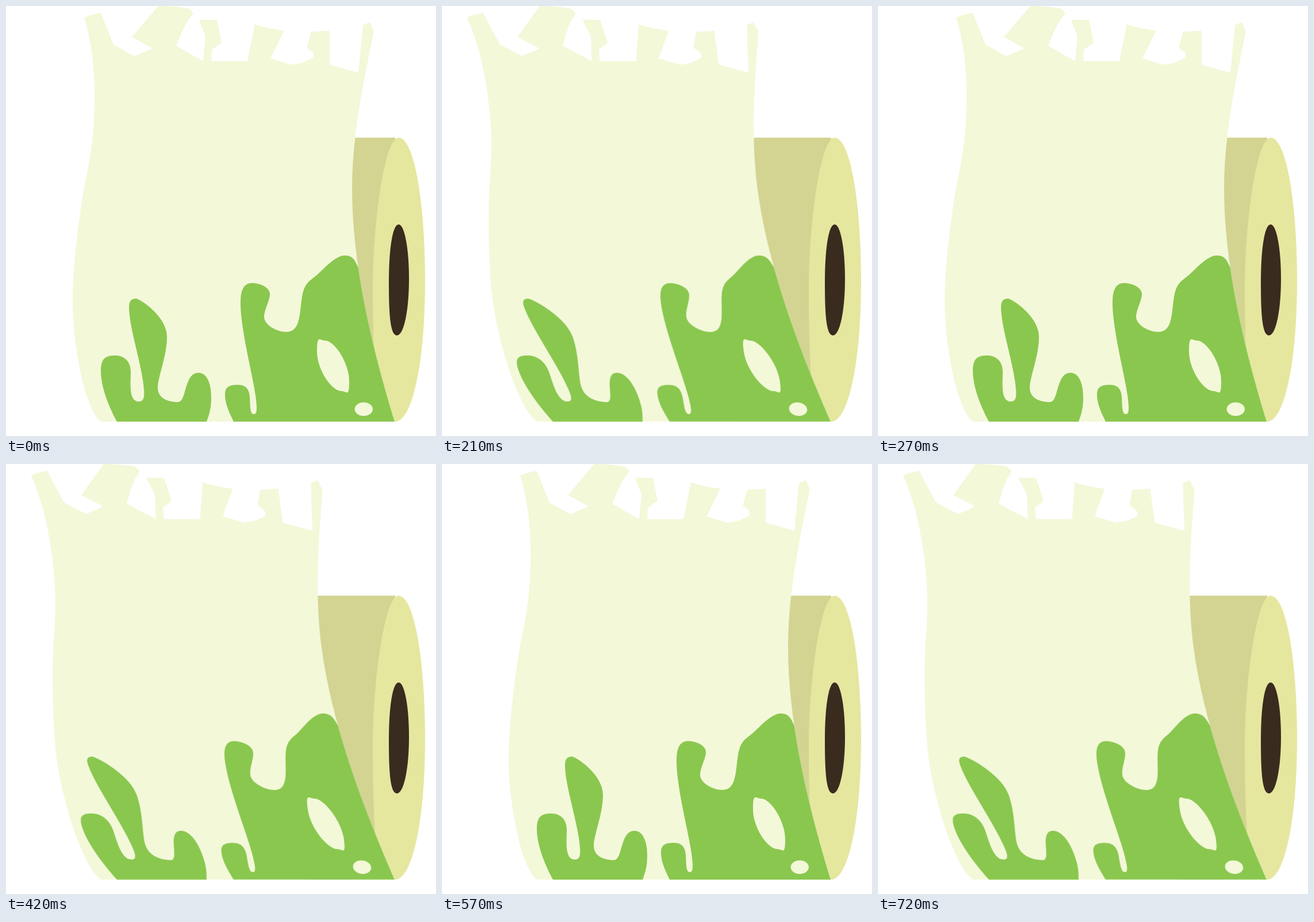
Write an HTML page that moves like this. It is 748 px wide and 748 px high and loops after 0.87 s.

```html
<!DOCTYPE html>
<html lang="en">
<head>
<meta charset="utf-8">
<title>Fluttering paper roll</title>
<style>
  html, body { margin: 0; width: 100%; height: 100%; overflow: hidden; background: #fff; }
  svg { display: block; width: 100%; height: 100%; }
  .paper { fill: #f3f8d9; }
  .slime { fill: #8ac74f; }
  .sheet { --lean: 7.49deg; }
  .drip { --lean: 19.65deg; }
  .sheet, .drip { transform-origin: 0 723px; animation: flutter 870ms step-end infinite; }
  @keyframes flutter {
    0%, 31.0345%, 65.5172% { transform: skewX(0deg); }
    13.7931%, 48.2759%, 82.7586%, 100% { transform: skewX(var(--lean)); }
  }
</style>
</head>
<body>
<svg viewBox="0 0 748 748">
  <defs>
    <path id="outline" d="M136 20C150 65 155 115 154 170S147 262 139 300 116 445 116 515 136 700 165 723H676
      C648 630 602 470 602 318C602 225 622 130 640 44L633 28 621 33 613 116 563 102V43L531 45 523 73
      C533 78 537 84 535 88S515 101 496 102L460 91 484 43Q458 40 433 32L420 96H357L358 76 375 64 367 24H336
      L347 53 343 96 296 69 306 45Q314 27 326 13L320 5Q296 0 265 0L219 54 255 74 223 87 187 67 165 12Q150 14 136 20Z"/>
    <clipPath id="inside"><use href="#outline"/></clipPath>
  </defs>

  <!-- roll -->
  <path fill="#d3d492" d="M520 229H677V723H520Z"/>
  <path fill="#e5e79f" d="M683 229C709 229 729 335 729 479S706 723 677 723H655C642 690 638 600 638 490S658 229 683 229Z"/>
  <path fill="#3a2b1f" d="M683 380C693 380 701 420 701 475S692 573 680 573 666 535 666 480 672 380 683 380Z"/>

  <!-- loose sheet -->
  <g class="sheet">
    <use href="#outline" class="paper"/>
    <g clip-path="url(#inside)">
      <path class="slime" d="M396 723C386 703 381 690 381 676S389 659 403 659 423 666 424 680 424 710 431 710
        C436 710 436 704 436 696C435 660 408 570 408 516C408 492 415 482 428 482S459 489 459 501 449 528 449 541 470 567 488 567
        C520 567 507 510 521 487C526 478 534 474 543 466S573 434 589 434 607 444 613 455L700 723Z"/>
    </g>
    <path class="paper" d="M555 582C572 582 597 622 597 652S593 670 584 670C566 670 541 632 541 601S546 582 555 582Z"/>
    <ellipse class="paper" cx="622.3" cy="701.3" rx="15.7" ry="11.8"/>
  </g>
  <g class="drip">
    <path class="slime" d="M193 723C175 690 165 658 165 635S174 608 190 608 217 618 217 637 213 688 231 688
      C240 688 241 680 240 667C237 625 214 560 214 524C214 512 219 509 226 509S280 540 280 575 264 645 264 664 283 689 299 689 309 638 335 638
      C350 638 357 658 357 680S353 712 349 723Z"/>
  </g>
</svg>
</body>
</html>
```
